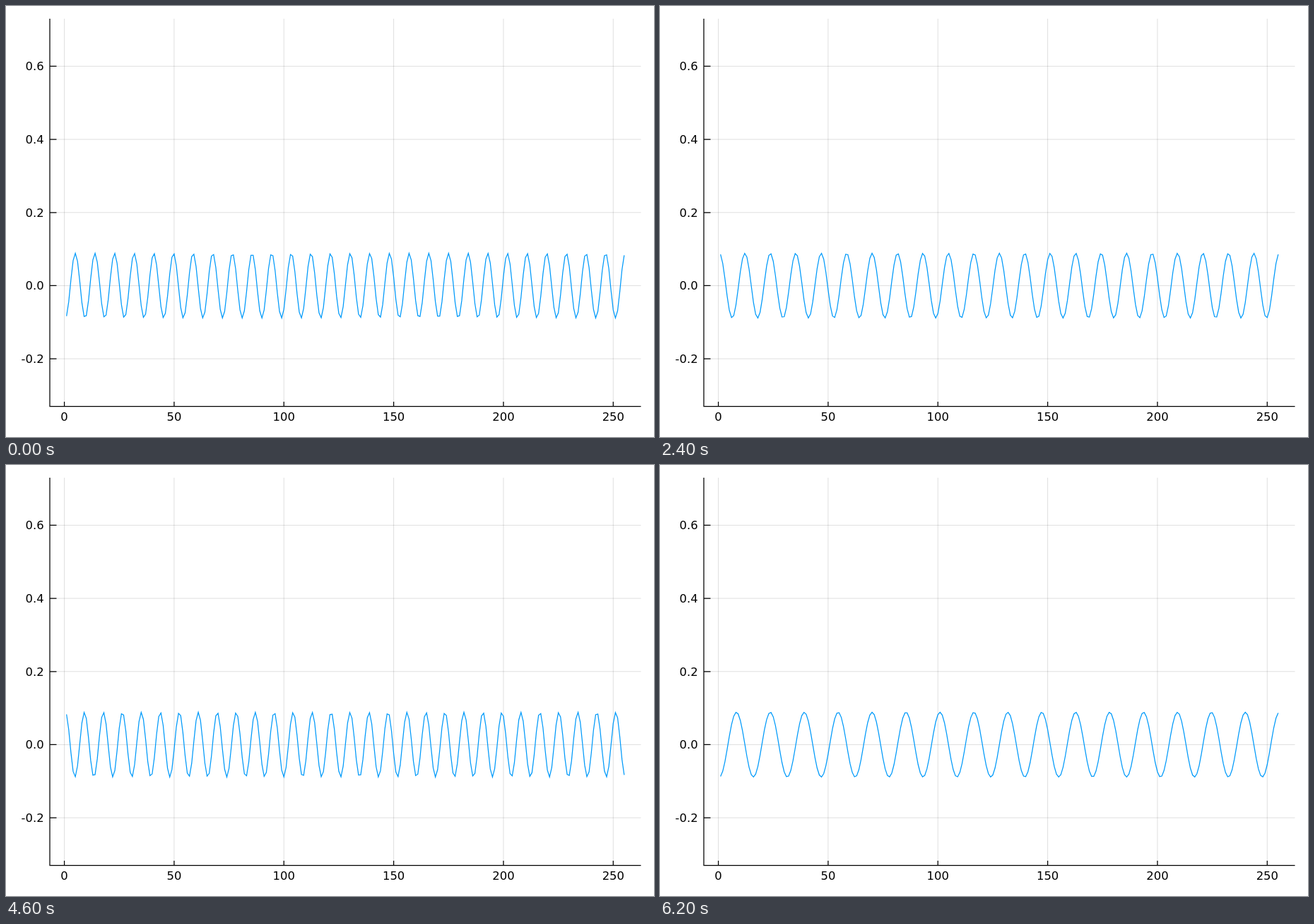
These frames come from a looping animation (917 px wide and 611 px high, 6400 ms). An HTML page:

```html
<!DOCTYPE html>
<html lang="en">
<head>
<meta charset="utf-8">
<title>Cosine modes</title>
<style>
html, body { margin: 0; width: 100%; height: 100%; overflow: hidden; background: #fff; }
svg { display: block; width: 917px; height: 611px; }
text { font: 16.4px "DejaVu Sans", sans-serif; }
.grid { stroke: #000; stroke-opacity: .13; }
.axis { stroke: #000; stroke-width: 1.25; fill: none; }
#wave { stroke: #009afa; stroke-width: 1.25; fill: none; }
</style>
</head>
<body>
<svg id="plot" viewBox="0 0 917 611"></svg>
<script>
const LEFT = 62, RIGHT = 898.5, TOP = 18, BOTTOM = 567.5;
const N = 255, STEP = 200;
// Half-waves along the line; a negative entry flips the curve.
const modes = [
  -57, 56, -55, 53, -54, 52, -50, 49, 51, -48, 47, -45, 44, -43, 42, -41,
  -46, 40, -39, 58, -62, 61, -60, 59, -38, 37, 63, -36, 35, -34, 32, -33
];

const px = x => LEFT + (x + 6.62) * (RIGHT - LEFT) / 269.24;
const py = y => TOP + (0.73 - y) * (BOTTOM - TOP) / 1.06;
const path = (cls, d) => `<path class="${cls}" d="${d}"/>`;
const label = (x, y, anchor, s) => `<text x="${x}" y="${y}" text-anchor="${anchor}">${s}</text>`;

let grid = "", axes = `M${LEFT} ${TOP}V${BOTTOM}H${RIGHT}`, labels = "";
for (let x = 0; x <= 250; x += 50) {
  const p = px(x);
  grid += `M${p} ${TOP}V${BOTTOM}`;
  axes += `M${p} ${BOTTOM}v-6.5`;
  labels += label(p, 588, "middle", x);
}
for (let i = -1; i <= 3; i++) {
  const p = py(i / 5);
  grid += `M${LEFT} ${p}H${RIGHT}`;
  axes += `M${LEFT} ${p}h9.5`;
  labels += label(53.6, p + 6, "end", (i / 5).toFixed(1));
}
document.getElementById("plot").innerHTML =
  path("grid", grid) + path("axis", axes) + labels + '<path id="wave"/>';

const wave = document.getElementById("wave");
function curve(mode) {
  const amp = Math.sign(mode) * Math.sqrt(2 / N);
  const pts = [];
  for (let i = 1; i <= N; i++) {
    const y = amp * Math.cos(Math.PI * mode * (i - 0.5) / N);
    pts.push(px(i).toFixed(2) + " " + py(y).toFixed(2));
  }
  return "M" + pts.join("L");
}

const curves = modes.map(curve);
let shown = -1;
function draw(now) {
  const n = Math.floor(now / STEP) % modes.length;
  if (n !== shown) wave.setAttribute("d", curves[shown = n]);
  requestAnimationFrame(draw);
}
draw(0);
</script>
</body>
</html>
```
